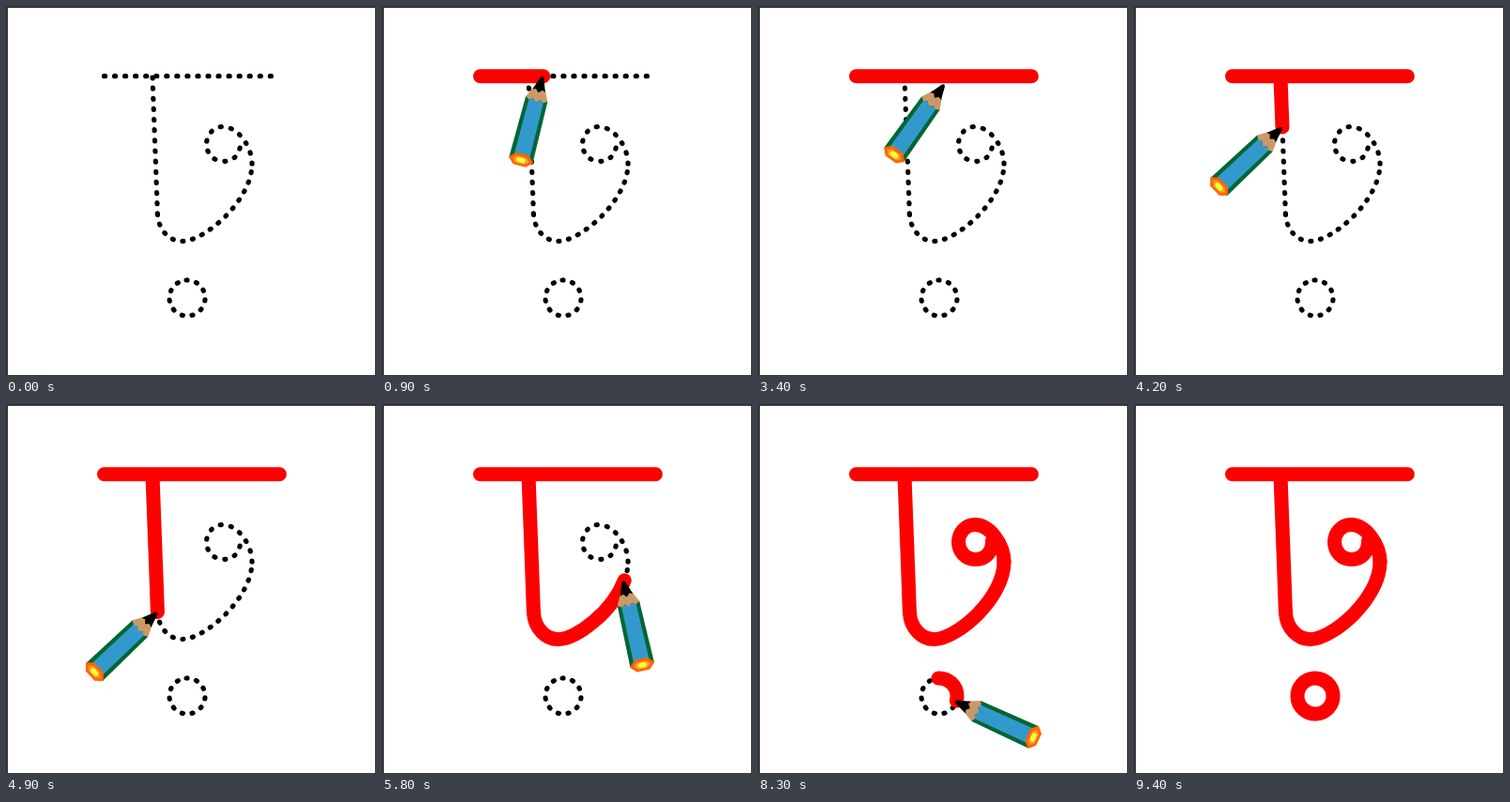
Animation, 394 px wide and 394 px high, one loop 9500 ms. Source, as an HTML page:

```html
<!DOCTYPE html>
<html lang="en">
<head>
<meta charset="utf-8">
<title>Tracing a letter</title>
<style>
  html, body { margin: 0; width: 100%; height: 100%; overflow: hidden; background: #fff; }
  svg { display: block; width: 100vw; height: 100vh; }
  .dots, .ink { fill: none; stroke-linecap: round; stroke-linejoin: round; }
  .dots { stroke: #000; stroke-width: 5.2; }
  .ink { stroke: #f00; stroke-width: 15; }
</style>
</head>
<body>
<svg viewBox="0 0 394 394">
  <rect width="394" height="394" fill="#333"/>
  <rect x="2" y="2" width="391" height="391" fill="#fff"/>
  <g id="dots"></g>
  <g id="ink"></g>
  <g id="pencil">
    <path d="M-12 24 L-6 12 H6 L12 24 L10 29 H-10Z" fill="#c96"/>
    <path d="M0 -1 L2 1 L7 15 L3.5 13.5 L0 17 L-3.5 13.5 L-7 15 L-2 1Z"/>
    <path d="M-12 24 L-7 27 L-4 24 L0 28 L4 24 L7 27 L12 24 L13 91 H-13Z" fill="#063"/>
    <path d="M-8 27 L-4 24 L0 28 L4 24 L8 27 L8.5 90 H-8.5Z" fill="#39c"/>
    <path d="M-13.5 91 L-7 84.5 H7 L13.5 91 L7 97.5 H-7Z" fill="#f60"/>
    <path d="M-9 91 L-5 87.5 H5 L9 91 L5 95 H-5Z" fill="#f93"/>
    <ellipse cy="91.3" rx="5" ry="2.8" fill="#ff3"/>
  </g>
</svg>
<script>
const LOOP = 9500, STEP = 100;
const $ = id => document.getElementById(id);

function addPath(parent, className, d) {
  const path = document.createElementNS('http://www.w3.org/2000/svg', 'path');
  path.setAttribute('class', className);
  path.setAttribute('d', d);
  return parent.appendChild(path);
}

// pitch: distance between guide dots
const strokes = [
  { start: 0, end: 2500, pitch: 11.05, d: 'M104.5 74.7 H291.3' },
  { start: 3800, end: 4900, pitch: 11.15, d: 'M156 76 L161.4 221.5' },
  { start: 4900, end: 5930, pitch: 10.85,
    d: 'M161.4 221.5 C162 238 174 251 188 250.5 C212 250 262 207 262 168' },
  { start: 5930, end: 6900, pitch: 11.25,
    d: 'M262 168 C262 150 247 128.5 231 128.5 C221 128.5 213.5 137 213.5 147 ' +
       'C213.5 157 221 165.5 231.5 165.5 C243 165.5 250 157 249.5 145' },
  { start: 8000, end: 9000, pitch: 10.85, d: 'M192 292 A19 19 0 0 1 194 330 A19 19 0 0 1 192 292' }
];
for (const s of strokes) {
  addPath($('dots'), 'dots', s.d).style.strokeDasharray = `1 ${s.pitch - 1}`;
  s.ink = addPath($('ink'), 'ink', s.d);
  s.length = s.ink.getTotalLength();
}

// Pencil moves between strokes: [time, x, y]
const hops = [
  [[2500, 292, 75], [3800, 156, 88]],
  [[6900, 250, 144], [8000, 193, 292]]
];
// Pencil lean: [time, degrees]
const lean = [
  [100, -17], [2500, -9.5], [3800, -47], [4900, -46.5], [5300, -43], [5800, 12.7],
  [5900, 13.5], [6000, 9], [6900, 18], [7300, 35.2], [8000, 69], [9000, 57], [9300, 54]
];

function interpolate(keys, t) {
  const i = keys.findIndex(k => k[0] >= t);
  if (i < 0) return keys[keys.length - 1].slice(1);
  if (i === 0) return keys[0].slice(1);
  const a = keys[i - 1], b = keys[i], f = (t - a[0]) / (b[0] - a[0]);
  return a.slice(1).map((v, n) => v + (b[n + 1] - v) * f);
}

function draw(t) {
  let tip = [193, 292];
  for (const s of strokes) {
    const drawn = s.length * Math.min(1, Math.max(0, (t - s.start) / (s.end - s.start)));
    s.ink.style.display = drawn > 0 ? '' : 'none';
    s.ink.style.strokeDasharray = drawn < s.length ? `${drawn} 999` : 'none';
    if (t >= s.start && t <= s.end) {
      const p = s.ink.getPointAtLength(drawn);
      tip = [p.x - 1, p.y + 1];
    }
  }
  for (const hop of hops) {
    if (t >= hop[0][0] && t < hop[1][0]) tip = interpolate(hop, t);
  }
  $('pencil').style.display = t >= 100 && t < 9400 ? '' : 'none';
  $('pencil').setAttribute('transform', `translate(${tip}) rotate(${-interpolate(lean, t)[0]})`);
}

const begin = performance.now();
function tick() {
  const t = (performance.now() - begin) % LOOP;
  draw(Math.floor(t / STEP) * STEP);
  requestAnimationFrame(tick);
}
tick();
</script>
</body>
</html>
```
